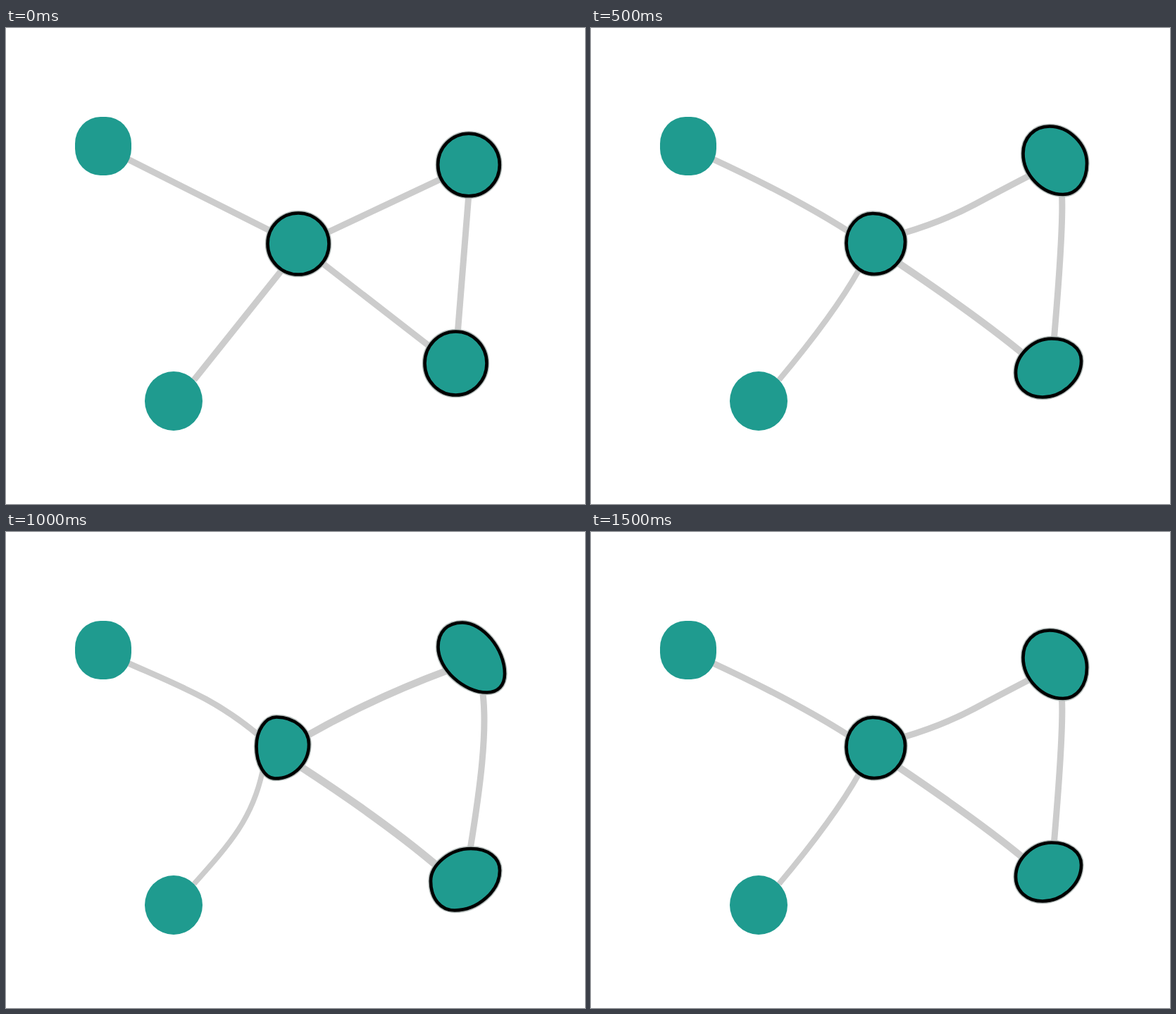
These frames come from a looping animation (822 by 675 pixels, 2 s). An HTML page:

```html
<!DOCTYPE html>
<html lang="en">
<head>
<meta charset="utf-8">
<title>Graph wobble</title>
<style>
  html, body { margin: 0; width: 100%; height: 100%; overflow: hidden; background: #fff; }
  svg { display: block; width: 822px; height: 675px; }
  .edges path { fill: none; stroke: #ccc; }
  .rim { fill: none; stroke: #b4bdbb; stroke-width: 7.5; }
  .node { fill: #1f9b8f; stroke: #000; stroke-width: 4.6; }
  .plain { fill: #1f9b8f; }
</style>
</head>
<body>
<svg viewBox="0 0 822 675">
  <g id="stage"></g>
  <rect class="plain" x="98" y="126" width="80" height="83" rx="36" ry="38"/>
  <ellipse class="plain" cx="238" cy="529" rx="41" ry="42"/>
</svg>
<script>
// Closed outline touching its box at four points: left (l, ly), top (tx, t), right (r, ry), bottom (bx, b).
// skew sharpens one diagonal of the outline and flattens the other.
function blob(l, ly, tx, t, r, ry, bx, b, skew = 0) {
  const corner = (x0, y0, x1, y1, cx, cy, k) => {
    const mix = (a, c) => a + (c - a) * k;
    return `C${mix(x0, cx)} ${mix(y0, cy)} ${mix(x1, cx)} ${mix(y1, cy)} ${x1} ${y1}`;
  };
  const sharp = 0.552 + skew, flat = 0.552 - skew;
  return `M${l} ${ly}` +
    corner(l, ly, tx, t, l, t, sharp) +
    corner(tx, t, r, ry, r, t, flat) +
    corner(r, ry, bx, b, r, b, sharp) +
    corner(bx, b, l, ly, l, b, flat) + 'Z';
}

const disc = (x, y, rx, ry) => blob(x - rx, y, x, y - ry, x + rx, y, x, y + ry);

const rest = {
  edges: [
    ['M170 184.5L380 290', 9], ['M452 292L622 212', 9], ['M446 331L606 455', 9],
    ['M657 235L641 435', 9], ['M267 499L391 344', 9]
  ],
  nodes: [disc(415, 306, 43.5, 43.5), disc(657, 194, 43.8, 44.3), disc(638.5, 475.5, 44, 45)]
};

const bent = {
  edges: [
    ['M170 184.5Q290 240 368 290', 9], ['M443 291Q500 274 545 250T625 208', 9],
    ['M436 333Q552 411 616 464', 10], ['M668 230Q672 270 657 445', 9], ['M267 499Q345 406 381 342', 8]
  ],
  nodes: [
    blob(362.5, 305, 400, 263, 446, 303, 402, 349),
    blob(613.5, 178, 651, 139.5, 704, 192, 670, 236, 0.03),
    blob(603, 489, 654, 440.5, 696, 472, 641, 523.5, -0.03)
  ]
};

const squashed = {
  edges: [
    ['M170 184.5C250 220 300 238 362 291', 8.5], ['M425 290Q520 236 625 197', 10],
    ['M417 332Q540 412 615 476', 11], ['M676 222C685 280 672 370 659 450', 9],
    ['M267 499C320 440 350 405 364 340', 7.5]
  ],
  nodes: [
    blob(355.5, 304, 384, 262.5, 430, 301, 382, 349.5),
    blob(613.5, 163, 648, 128.5, 708, 201, 683, 227.5, 0.07),
    blob(603, 495, 660, 449, 701, 480, 637, 536.5, -0.04)
  ]
};

const render = ({ edges, nodes }) =>
  '<g class="edges">' + edges.map(([d, w]) => `<path d="${d}" stroke-width="${w}"/>`).join('') + '</g>' +
  nodes.map(d => `<path class="rim" d="${d}"/><path class="node" d="${d}"/>`).join('');

const poses = [rest, bent, squashed, bent].map(render);
const stage = document.getElementById('stage');
const start = performance.now();
let shown = -1;

function tick() {
  const step = Math.floor((performance.now() - start) / 500) % poses.length;
  if (step !== shown) stage.innerHTML = poses[shown = step];
  requestAnimationFrame(tick);
}
tick();
</script>
</body>
</html>
```
